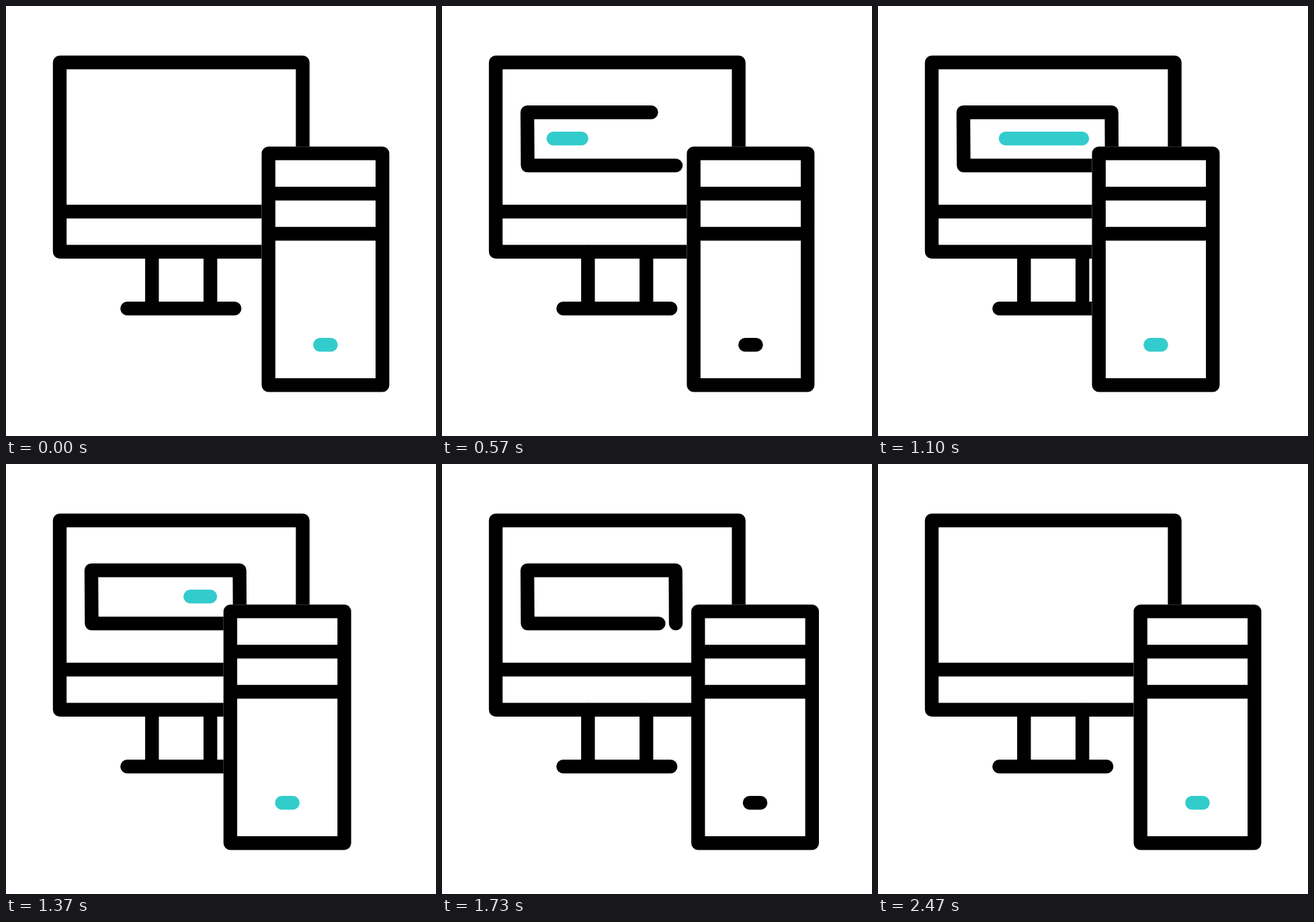
Recreate the animation shown at these times as an HTML page. Size 640 px wide and 640 px high, loop 2.5 s.

```html
<!DOCTYPE html>
<html lang="en">
<head>
<meta charset="utf-8">
<title>Desktop computer</title>
<style>
  html, body { margin: 0; width: 100%; height: 100%; overflow: hidden; background: #fff; }
  svg { display: block; width: 100vw; height: 100vh; }
</style>
</head>
<body>
<svg viewBox="0 0 640 640" fill="none" stroke="#000" stroke-width="20.4" stroke-linecap="round" stroke-linejoin="round">
  <path d="M80 84H441.6V365.8H80ZM80 306H441.6"/>
  <path d="M217.3 366V450.3M304.2 366V450.3M180.4 450.3H340.2"/>
  <path id="frame" pathLength="1" d="M348 237.4L347.6 158.2H127L127.5 237.4H348"/>
  <path id="bar" pathLength="1" stroke="#3cc" d="M165.8 197.2H304"/>
  <g id="tower">
    <rect x="380.5" y="209.2" width="190" height="365.2" rx="10.2" fill="#fff" stroke="none"/>
    <path d="M390.7 219.4H560.3V564.2H390.7ZM390.7 279.2H560.3M390.7 339H560.3"/>
    <path id="lamp" d="M467.4 504.2H483.6"/>
  </g>
</svg>
<script>
const LOOP = 2500, STEP = 100 / 3, SHIFT = 62;
const [frame, bar, tower, lamp] =
  ['frame', 'bar', 'tower', 'lamp'].map(id => document.getElementById(id));

// Progress from 0 to 1 between two times, with horizontal bezier handles x1 and x2
function ease(t, from, to, x1 = 1 / 3, x2 = 2 / 3) {
  const u = (t - from) / (to - from);
  if (u <= 0) return 0;
  if (u >= 1) return 1;
  let lo = 0, hi = 1, s;
  for (let i = 0; i < 24; i++) {
    s = (lo + hi) / 2;
    const r = 1 - s;
    const x = 3 * s * r * r * x1 + 3 * s * s * r * x2 + s * s * s;
    if (x < u) lo = s; else hi = s;
  }
  return s * s * (3 - 2 * s);
}

// Show only the part of a path between a and b
function trim(path, a, b) {
  const len = b - a;
  path.style.display = len > 0.0002 ? '' : 'none';
  path.setAttribute('stroke-dasharray', `${Math.max(len, 0)} 2`);
  path.setAttribute('stroke-dashoffset', -a);
}

const within = (t, a, b) => t >= a && t < b;

function draw(ms) {
  const t = Math.floor((ms % LOOP + 4) / STEP) * STEP % LOOP;
  trim(frame,
    1 - ease(t, 0, 903, 0.35, 0.45),
    1 - ease(t, 1633, 2466, 0.35, 0.45));
  trim(bar, ease(t, 937, 1550), ease(t, 284, 1058));
  const x = SHIFT * (ease(t, 1253, 1891) - ease(t, 378, 943));
  tower.setAttribute('transform', `translate(${x.toFixed(2)} 0)`);
  const off = within(t, 425, 715) || within(t, 1585, 1875);
  lamp.setAttribute('stroke', off ? '#000' : '#3cc');
}

const start = performance.now();
function tick() {
  draw(performance.now() - start);
  requestAnimationFrame(tick);
}
tick();
</script>
</body>
</html>
```
